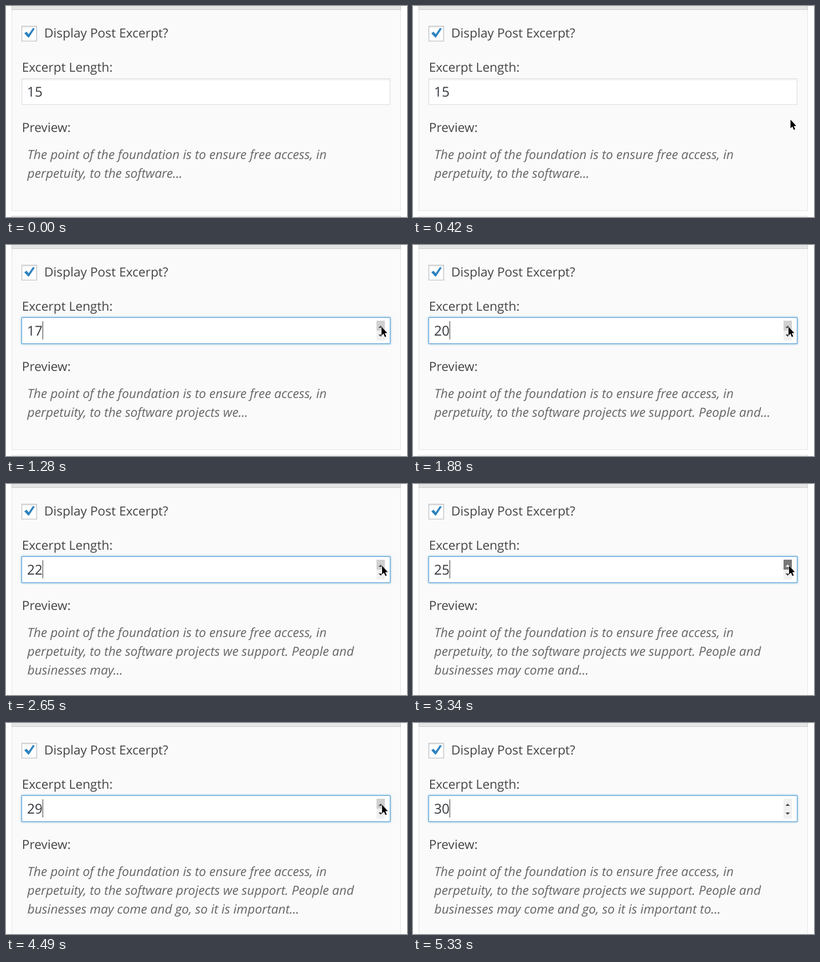
An HTML page for the animation above (5650 ms loop, 724 by 382 pixels).

```html
<!DOCTYPE html>
<html lang="en">
<head>
<meta charset="utf-8">
<title>Excerpt length</title>
<style>
html, body { margin: 0; width: 100%; height: 100%; overflow: hidden; background: #fff; }
div { position: absolute; box-sizing: border-box; }
svg { position: absolute; left: 0; top: 0; overflow: hidden; }
#stage { left: 0; top: 0; width: 100%; height: 100%; overflow: hidden; contain: strict; }
#panel { left: 10px; top: 0; width: 703px; height: 371px; background: #fafafa; border: 1px solid #e5e5e5; }
#panel.tall { height: 100%; border-bottom: 0; }
#bar { left: 10px; top: 0; width: 703px; height: 7px; background: #e5e5e5; border: 1px solid #ccc; border-top: 0; }
#next { left: 10px; top: 380px; width: 703px; height: 2px; background: #fafafa; border: 1px solid #ccc; border-bottom: 0; }
#box { left: 28px; top: 36px; width: 28px; height: 28px; background: #fff; border: 1px solid #b4b9be; box-shadow: inset 0 2px 3px #0000001a; }
#field { left: 28px; top: 131px; width: 666px; height: 48px; background: #fff; border: 1px solid #ddd; box-shadow: inset 0 2px 3px #00000012; }
#field.half { border-color: #86b9e2; box-shadow: 0 0 3px #1e8cbe88; }
#field.full { border-color: #5b9dd9; box-shadow: 0 0 3.5px #1e8cbecc; }
text { font: 22.75px "Open Sans", sans-serif; fill: #444; text-rendering: geometricPrecision; }
#value { font-size: 24.5px; fill: #32373c; }
.line { font-size: 22.82px; font-style: italic; fill: #666; }
</style>
</head>
<body>
<div id="stage">
  <div id="panel"></div>
  <div id="bar"></div>
  <div id="next"></div>
  <div id="box"></div>
  <div id="field"></div>
  <svg width="724" height="382">
    <path d="M33 49.5L37 46.5L41 51L48.5 40L52 41L41.5 57H40Z" fill="#2e83c0"/>
    <text x="69" y="57">Display Post Excerpt?</text>
    <text x="28.7" y="119">Excerpt Length:</text>
    <text x="28.7" y="228">Preview:</text>
    <text id="value" x="38" y="164"></text>
    <rect id="caret" x="66" y="138" width="1" height="33" fill="#333"/>
    <text class="line" x="38.5" y="277"></text>
    <text class="line" x="38.5" y="311"></text>
    <text class="line" x="38.5" y="345"></text>
    <g id="spinner">
      <rect id="up" x="669" y="137" width="15" height="18"/>
      <rect id="down" x="669" y="155" width="15" height="18"/>
      <path id="upArrow" d="M672.5 150h8l-4-4z"/>
      <path d="M672.5 162h8l-4 4z" fill="#444"/>
    </g>
    <path id="cursor" d="M0 0V15.5L3.4 12.4L6 18.5L8.4 17.4L5.8 11.4H10.4Z" stroke="#fff" paint-order="stroke"/>
  </svg>
</div>
<script>
const LOOP = 5650, START = 15;
const words = ("The point of the foundation is to ensure free access, in perpetuity, to the software projects " +
  "we support. People and businesses may come and go, so it is important to").split(" ");
const breaks = [0, 11, 20, 30];

// Each click: the value steps on press, the preview follows on release.
const presses = [820, 1180, 1400, 1590, 1880, 2180, 2500, 2780, 3010, 3340, 3640, 3940, 4190, 4420, 4820];
const releases = [960, 1260, 1480, 1590, 1880, 2260, 2650, 2860, 3190, 3480, 3720, 4030, 4260, 4490, 4900];

const el = id => document.getElementById(id);
const lines = document.querySelectorAll(".line");
const passed = (times, t) => times.filter(time => time <= t).length;
const show = (node, on) => node.style.display = on ? "" : "none";

function pointer(t) {
  if (t < 70 || t >= 5330) return null;
  if (t < 580) {
    const p = Math.floor((t - 70) / 73) / 7, rest = (1 - p) ** 1.6;
    return [678 + 14 * rest, 148 + 224 * rest];
  }
  if (t < 4980) return t < 2180 ? [678, 148] : [679, 148];
  const step = 1 + Math.floor((t - 4980) / 87.5);
  return [679 - step, 148 + 240 * (step / 5) ** 1.5];
}

function render(t) {
  const clicks = passed(presses, t), done = passed(releases, t);
  const pressed = clicks > done, focused = clicks > 0, count = START + done;
  const at = pointer(t);
  const over = (top, bottom) => at && at[1] >= top && at[1] < bottom;

  el("value").textContent = START + clicks;
  lines.forEach((line, i) => {
    const end = Math.min(count, breaks[i + 1]);
    const text = words.slice(breaks[i], end).join(" ");
    line.textContent = text && end === count ? text + "..." : text;
  });

  const tall = count > breaks[2];
  el("panel").className = tall ? "tall" : "";
  show(el("next"), !tall);
  el("next").style.borderColor = t < 70 ? "#c8c8c8" : "#e2e2e2";

  el("field").className = !focused ? "" : t < 900 ? "half" : "full";
  show(el("caret"), focused);
  show(el("spinner"), focused || over(131, 179));
  el("up").setAttribute("fill", pressed ? "#777" : over(137, 155) ? "#d0d0d0" : "#f0f0f0");
  el("down").setAttribute("fill", over(155, 173) ? "#d0d0d0" : "#f0f0f0");
  el("upArrow").setAttribute("fill", pressed ? "#fff" : "#444");

  show(el("cursor"), at);
  if (at) el("cursor").setAttribute("transform", `translate(${at})`);
}

function frame() {
  render(performance.now() % LOOP);
  requestAnimationFrame(frame);
}
frame();
</script>
</body>
</html>
```
